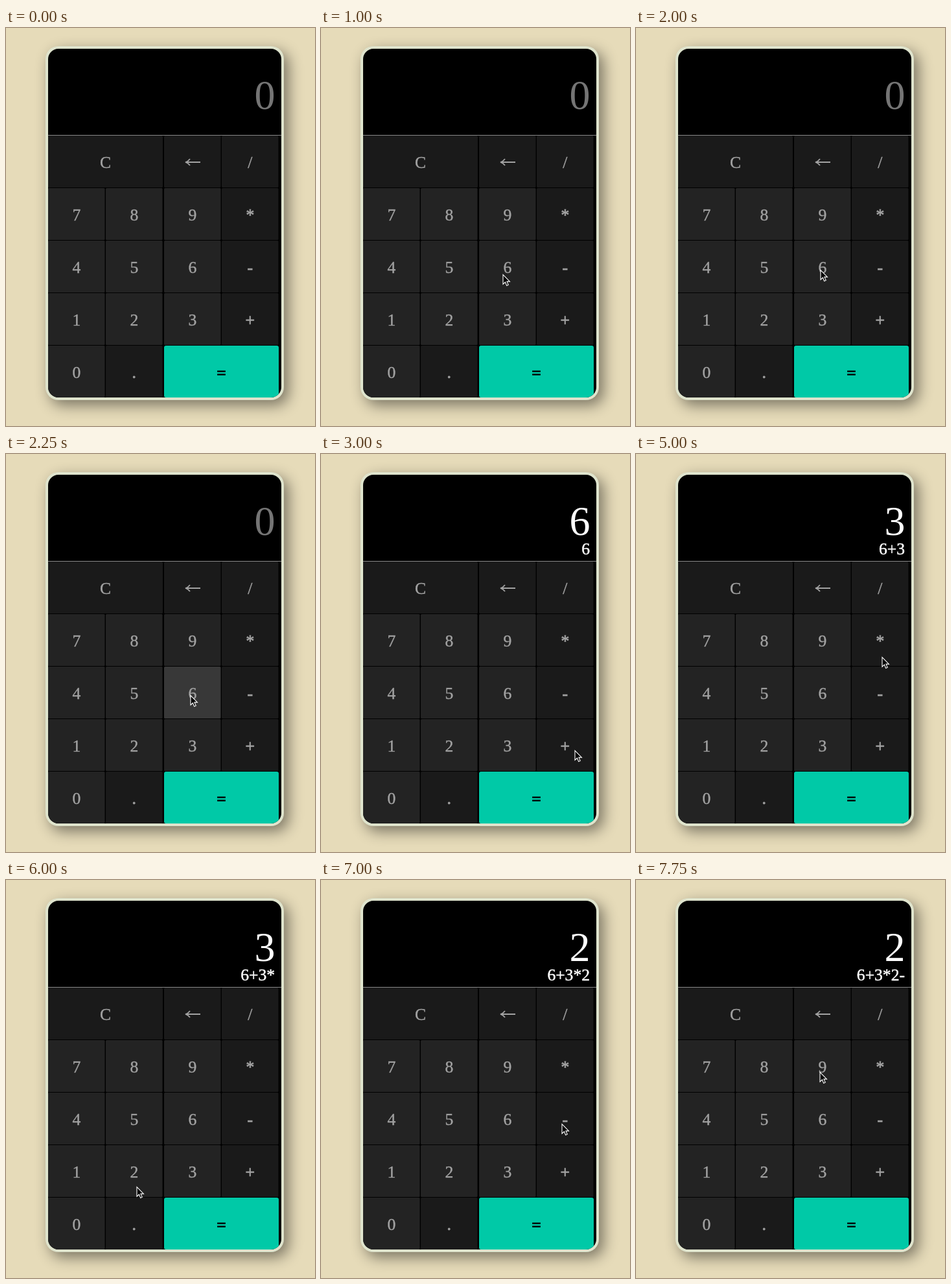
Animation of 477x614 px, one loop 8000 ms. Source, as an HTML page:

```html
<!DOCTYPE html>
<html lang="en">
<head>
<meta charset="utf-8">
<title>Calculator</title>
<style>
html, body { margin: 0; width: 100%; height: 100%; overflow: hidden; background: #e6dbb9; }
svg { display: block; width: 477px; height: 614px; font: 25.6px "Liberation Serif", "Times New Roman", serif; }
.case { filter: drop-shadow(7px 8px 11px #0007); }
#keys text { fill: #a2a2a2; stroke: #a2a2a2; stroke-width: .4; text-anchor: middle; }
#keys .operator { stroke-width: .8; }
#keys .equal { fill: #000; stroke: #000; stroke-width: .9; }
#value, #sum { fill: #fff; text-anchor: end; }
#value { font-size: 64px; }
#sum { stroke: #fff; stroke-width: .5; }
</style>
</head>
<body>
<svg viewBox="0 0 477 614">
  <clipPath id="inner"><rect x="65" y="32" width="360" height="538" rx="16"/></clipPath>
  <rect class="case" x="61" y="28" width="368" height="546" rx="20" fill="#dfe4cd"/>
  <g clip-path="url(#inner)">
    <rect x="65" y="32" width="360" height="538"/>
    <path d="M65 165.5H425" stroke="#888"/>
    <g id="keys"></g>
  </g>
  <path d="M300 207H277.5M284 202Q281 206 277 207Q281 208 284 212" fill="none" stroke="#a2a2a2" stroke-width="1.8"/>
  <text id="value" x="415.5" y="125"></text>
  <text id="sum" x="415" y="155"></text>
  <path id="cursor" d="M0 .5V15.2L3.4 12L5.7 17.4L8.2 16.3L5.9 11.1H10.4Z" stroke="#fff" stroke-width="1.1"/>
</svg>
<script>
const $ = id => document.getElementById(id);
const NS = 'http://www.w3.org/2000/svg';
const LOOP = 8000, TICK = 250;

function add(tag, attrs, text = '') {
  const node = document.createElementNS(NS, tag);
  for (const k in attrs) node.setAttribute(k, attrs[k]);
  node.textContent = text;
  return $('keys').appendChild(node);
}

const keys = {};
function addKey(label, col, row, span = 1) {
  const x = Math.round(65 + col * 89.4), y = 166 + row * 81;
  const width = span * 89.4 - 1.8;
  const isDigit = /\d/.test(label), isEqual = label === '=';
  const fill = isEqual ? '#00c9a7' : isDigit ? '#232323' : '#1a1a1a';
  keys[label] = add('rect', { x, y, width, height: 80, rx: isEqual ? 3 : 1.5, fill });
  if (label === '←') return; // drawn as a path
  const kind = isEqual ? 'equal' : /[-+*.]/.test(label) ? 'operator' : '';
  add('text', { class: kind, x: x + width / 2, y: y + (isEqual ? 51 : 49.5) }, label);
}

addKey('C', 0, 0, 2);
addKey('←', 2, 0);
addKey('/', 3, 0);
['789*', '456-', '123+', '0.'].forEach((line, row) =>
  [...line].forEach((label, col) => addKey(label, col, row + 1)));
addKey('=', 2, 4, 2);

// Pointer trips: leave and arrive in ms, then the place reached
const entry = { x: 416, y: 540 };
const trips = [
  [250, 1000, 281, 380], [1750, 2250, 285, 372], [2500, 3000, 392, 457], [3250, 4000, 289, 462],
  [4250, 5000, 380, 313], [5250, 6000, 202, 473], [6500, 7000, 372, 376], [7250, 7750, 284, 296]
];

function pointerAt(t) {
  let { x, y } = entry;
  for (const [leave, arrive, toX, toY] of trips) {
    const p = Math.min(1, Math.max(0, (t - leave) / (arrive - leave)));
    const eased = 1 - (1 - p) ** 3;
    x += (toX - x) * eased;
    y += (toY - y) * eased;
  }
  return `translate(${Math.round(x)} ${Math.round(y)})`;
}

function draw(now) {
  const t = Math.floor(now % LOOP / TICK) * TICK;

  // After the first key, one more is typed every second
  const typed = t < 2500 ? 0 : Math.floor((t - 1250) / 1000);
  const sum = '6+3*2-'.slice(0, typed);
  $('sum').textContent = sum;
  $('value').textContent = (sum.match(/\d/g) || ['0']).pop();
  $('value').style.fill = sum ? '#fff' : '#757575';

  $('cursor').style.display = t < trips[0][0] ? 'none' : '';
  $('cursor').setAttribute('transform', pointerAt(t));
  keys[6].setAttribute('fill', t === 2250 ? '#383838' : '#232323');
}

const start = performance.now();
function loop() {
  draw(performance.now() - start);
  requestAnimationFrame(loop);
}
loop();
</script>
</body>
</html>
```
